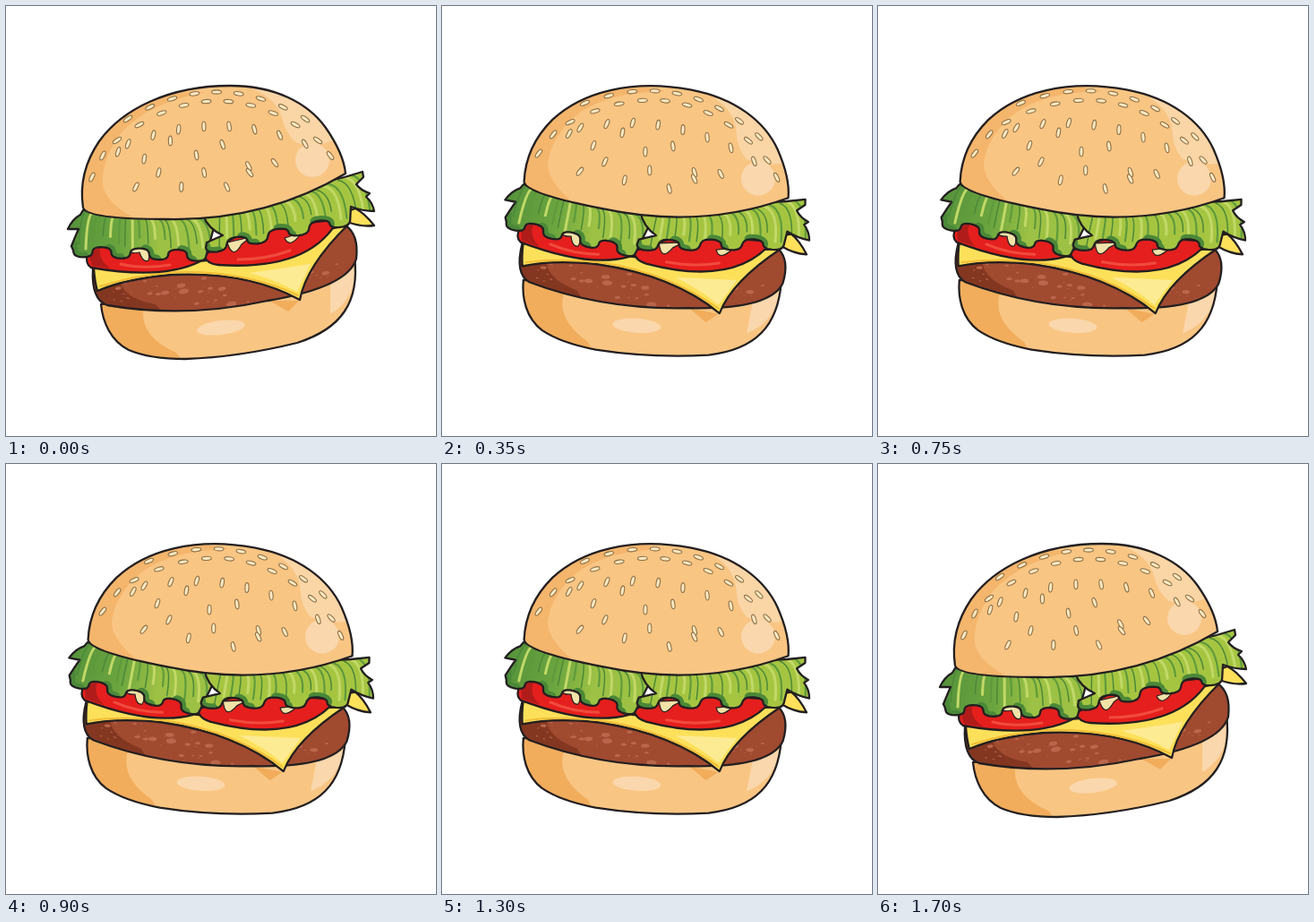
Animation of 480 by 480 pixels, one loop 1.75 s. Source, as an HTML page:

```html
<!DOCTYPE html>
<html lang="en">
<head>
<meta charset="utf-8">
<title>Swaying burger</title>
<style>
  html, body { margin: 0; width: 100%; height: 100%; overflow: hidden; background: #fff; }
  svg { display: block; width: 100%; height: 100%; }
  .ink { stroke: #231f20; stroke-width: 2.3; stroke-linejoin: round; stroke-linecap: round; }
  .line { fill: none; stroke-linecap: round; }
</style>
</head>
<body>
<svg viewBox="0 0 480 480">
  <defs>
    <path id="crown" d="M86 225C82 198 89 173 104 151C130 115 182 89 250 89C300 89 337 108 357 136Q377 165 379 187Q290 240 180 238Q90 238 86 225Z"/>
    <path id="heel" d="M106 333C108 353 117 374 137 384Q160 394 200 394Q260 392 325 376C375 360 395 330 389 280Z"/>
    <path id="meat" d="M97 293Q95 328 113 334Q200 349 292 329Q382 314 391 282Q394 255 379 245L230 278Z"/>
    <path id="leftLeaf"/>
    <path id="rightLeaf"/>
    <clipPath id="inCrown"><use href="#crown"/></clipPath>
    <clipPath id="inHeel"><use href="#heel"/></clipPath>
    <clipPath id="inMeat"><use href="#meat"/></clipPath>
    <clipPath id="inLeftLeaf"><use href="#leftLeaf"/></clipPath>
    <clipPath id="inRightLeaf"><use href="#rightLeaf"/></clipPath>
    <linearGradient id="green">
      <stop stop-color="#55923b"/><stop offset=".35" stop-color="#6ba53f"/><stop offset=".6" stop-color="#9cc144"/>
    </linearGradient>
  </defs>

  <g id="burger">
    <!-- bottom bun -->
    <use href="#heel" fill="#f9c583"/>
    <g clip-path="url(#inHeel)">
      <path fill="#f1ad5c" d="M100 330L153 340Q151 370 190 387L200 400H100Z"/>
      <path fill="#f1ad5c" d="M294 329H327L315 341Z"/>
      <path fill="#fad7ac" d="M362 309L392 290Q389 328 362 344Z"/>
    </g>
    <ellipse cx="240" cy="359" rx="27" ry="8" transform="rotate(-7 240 359)" fill="#fad7ac"/>
    <use href="#heel" class="ink" fill="none"/>

    <!-- patty -->
    <use href="#meat" fill="#a04a30"/>
    <g clip-path="url(#inMeat)">
      <path fill="#843720" d="M94 285L126 304Q130 327 167 333L180 347H94Z"/>
      <g id="crumbs" fill="#b9664c"></g>
    </g>
    <use href="#meat" class="ink" fill="none"/>

    <!-- cheese -->
    <path class="ink" fill="#ffe05a" d="M379 230L390 226Q400 231 411 245Q397 247 381 241L369 253Z"/>
    <path class="ink" fill="#fde05a" d="M98 293Q99 307 102 318Q135 304 185 300Q270 296 328 328Q335 290 382 244L225 284Z"/>
    <path fill="#fdeb94" d="M272 298L340 288L325 319Q300 305 272 298Z"/>
    <path class="line" stroke="#f2bd36" stroke-width="2" d="M105 313Q145 300 191 297Q265 295 326 323"/>

    <!-- tomatoes -->
    <path class="ink" fill="#e51f1d" d="M91 276Q88 288 95 292Q175 306 217 285L189 262H100Z"/>
    <path fill="#b01c1a" d="M92 276L105 270Q103 284 117 293L96 290Z"/>
    <path class="ink" fill="#e51f1d" d="M221 278Q224 288 237 289Q340 296 371 238L270 250Z"/>
    <path class="line" stroke="#f14b3d" stroke-width="3" d="M128 288Q153 294 183 289M259 283Q290 283 317 273"/>

    <!-- sauce -->
    <g class="ink" fill="#f3e3a8" style="stroke-width:1.2">
      <path d="M129 262Q134 279 149 275Q153 287 159 284L164 262Z"/>
      <path d="M247 264Q253 284 263 266L273 258Z"/>
      <path d="M311 259Q317 272 330 253Z"/>
    </g>

    <g id="lettuce"></g>

    <!-- top bun -->
    <use href="#crown" fill="#f9c583"/>
    <g clip-path="url(#inCrown)">
      <path fill="#f4b56c" d="M80 240V140L150 108Q184 94 222 96Q160 108 130 140Q106 170 108 200Q112 222 150 240Z"/>
      <path fill="#fad5a6" d="M276 93Q302 103 308 125Q312 143 325 153Q345 158 366 150Q345 95 276 93Z"/>
      <circle cx="342" cy="172" r="19" fill="#fad7ac"/>
    </g>
    <g id="seeds" fill="#fbe8c0" stroke="#8b7047" stroke-width="1.1"></g>
    <use href="#crown" class="ink" fill="none"/>
  </g>
</svg>
<script>
  const byId = id => document.getElementById(id);
  const lerp = (a, b, u) => a + (b - a) * u;
  const range = n => Array.from({ length: n }, (_, i) => i);

  let state = 19;
  const random = () => (state = state * 16807 % 2147483647) / 2147483647;

  const ellipse = (x, y, rx, ry, tilt) =>
    `<ellipse cx="${x}" cy="${y}" rx="${rx}" ry="${ry}" transform="rotate(${tilt} ${x} ${y})"/>`;

  // Sesame seeds lie on arcs and turn from along the rim to upright.
  const rows = [
    { from: 136, to: 334, top: 96, drop: 30, count: 9 },
    { from: 124, to: 348, top: 106, drop: 44, count: 10 },
    { from: 108, to: 362, top: 134, drop: 33, count: 10 },
    { from: 96, to: 300, top: 158, drop: 25, count: 8 },
    { from: 145, to: 272, top: 194, drop: 0, count: 6 }
  ];
  byId("seeds").innerHTML = rows.map(({ from, to, top, drop, count }, row) =>
    range(count).map(i => {
      const u = i / (count - 1), side = 2 * u - 1;
      const x = lerp(from, to, u);
      const y = top + drop * side * side + (row > 2 ? 8 * Math.cos(i * Math.PI) : 0);
      return ellipse(x, y, 5.4, 2.1, row < 2 ? 35 * side : 85 - 32 * side);
    }).join("")).join("");

  byId("crumbs").innerHTML = range(60).map(() => {
    const x = lerp(120, 385, random());
    const y = x < 310 ? lerp(304, 334, random()) : lerp(255, 303, random());
    const size = 1 + 5 * random() ** 4;
    return ellipse(x, y, size, size / 2, -10);
  }).join("");

  // Lettuce: a frilled hem below the bun, with folds hanging from its edge.
  const bunEdge = x => 239 - 49 * ((x - 180) / 200) ** 2;
  const hemY = (leaf, u) => lerp(leaf.y0, leaf.y1, u) + 6 * Math.cos(7 * Math.PI * (u - 0.08));
  const hem = leaf => range(61).map(i => {
    const u = i / 60;
    const x = lerp(leaf.x0, leaf.x1, u) + 3 * Math.sin(14 * Math.PI * (u - 0.08));
    return `L${x.toFixed(1)} ${hemY(leaf, u).toFixed(1)}`;
  }).join("");

  function drawLeaf(leaf) {
    const { id, x0, x1, fill, start, end, folds, lean } = leaf;
    const edge = hem(leaf);
    byId(id).setAttribute("d", start + edge + end);
    const strokes = range(folds).map(i => {
      const u = (i + 0.3 + 0.4 * random()) / folds;
      const x = lerp(x0 + 12, x1 + 12, u), top = bunEdge(x);
      const reach = (hemY(leaf, u) - top) * lerp(0.5, 0.95, random());
      const shift = lean + 22 * (u - 0.5);
      const [color, width] = [["#4b8838", 1.5], ["#c1d967", 3], ["#5e9a3c", 2.2]][i % 3];
      return `<path class="line" stroke="${color}" stroke-width="${width}"
        d="M${x} ${top}q${shift} 3 ${shift * 1.2} ${reach}"/>`;
    }).join("");
    byId("lettuce").innerHTML += `
      <use href="#${id}" fill="${fill}"/>
      <g clip-path="url(#in${id[0].toUpperCase() + id.slice(1)})">
        ${strokes}
        <path class="line" stroke="#4b8838" stroke-width="11" stroke-dasharray="18 34" d="M${x0} ${leaf.y0}${edge}"/>
      </g>
      <use href="#${id}" class="ink" fill="none"/>`;
  }

  drawLeaf({
    id: "leftLeaf", x0: 74, y0: 274, x1: 222, y1: 279, fill: "url(#green)", folds: 20, lean: 3,
    start: "M86 228L83 233Q74 238 69 249L81 249Q77 258 73 268", end: "L240 218Z"
  });
  drawLeaf({
    id: "rightLeaf", x0: 222, y0: 271, x1: 383, y1: 239, fill: "#a5c541", folds: 22, lean: 10,
    start: "M220 234Q226 249 242 256L224 264",
    end: "L385 224Q398 229 411 229Q409 219 402 213L406 209Q396 206 391 199L399 191L398 185L378 191L300 210Z"
  });

  const LOOP = 1750, STEP = 50, SWAY = 550, SWING = 15;
  const burger = byId("burger");
  const start = performance.now();

  // Three linear swings at 20 steps per second, then a short rest.
  function draw() {
    const elapsed = (performance.now() - start) % LOOP;
    const time = Math.min(Math.floor(elapsed / STEP) * STEP, 3 * SWAY);
    const phase = time % SWAY / SWAY;
    const angle = SWING * (1 - Math.abs(1 - 2 * phase));
    burger.setAttribute("transform", `rotate(${angle} 240 240)`);
    requestAnimationFrame(draw);
  }
  draw();
</script>
</body>
</html>
```
